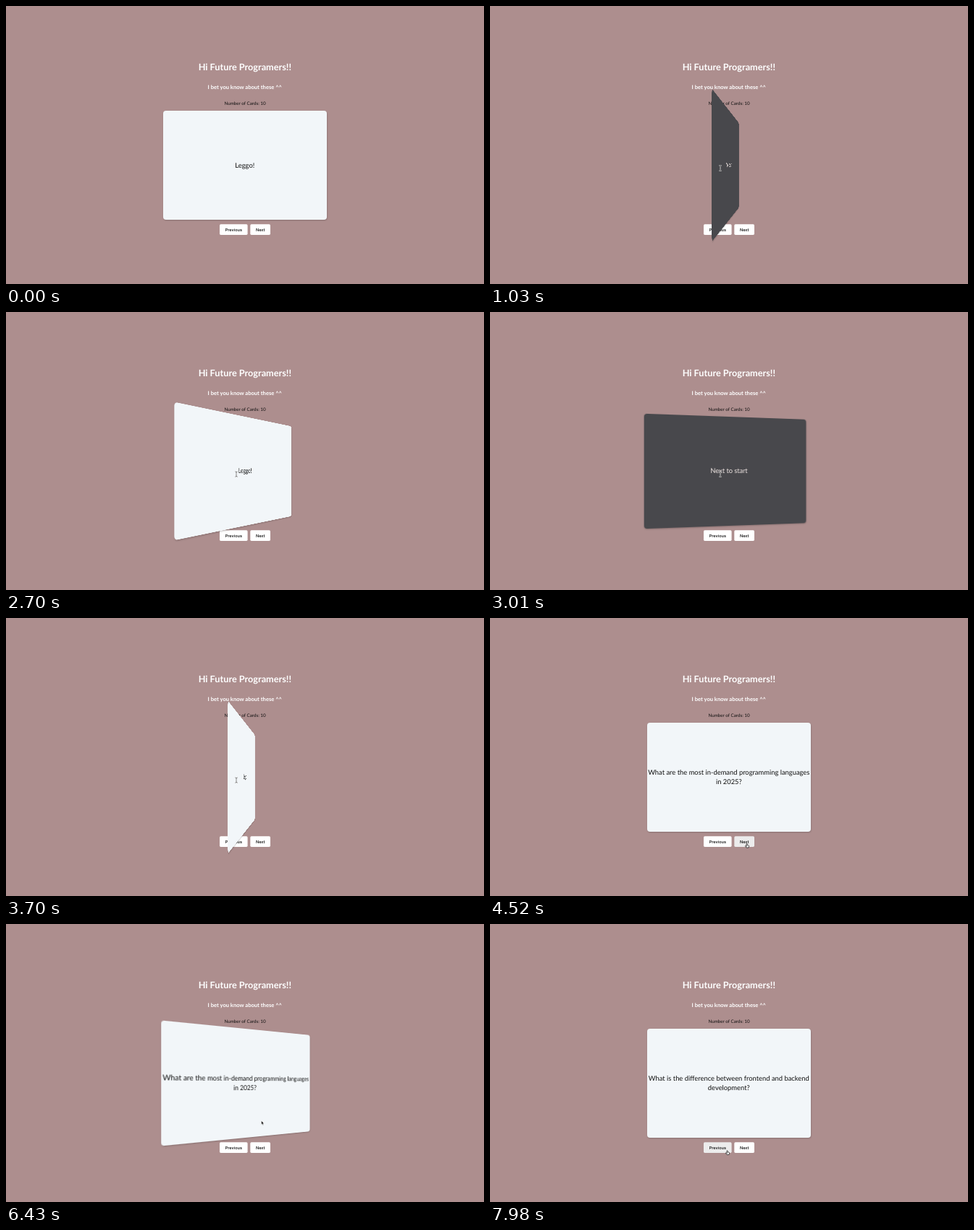
An HTML page for the animation above (8000 ms loop, 660 px wide and 385 px high).

```html
<!DOCTYPE html>
<html lang="en">
<head>
<meta charset="utf-8">
<title>Flashcards</title>
<style>
  html, body { margin: 0; width: 100%; height: 100%; overflow: hidden; background: #ad8e8e; }
  #stage { position: relative; width: 660px; height: 385px; overflow: hidden; }
  svg { position: absolute; left: 0; top: 0; font-family: Lato, sans-serif; text-rendering: geometricPrecision; }
  .btn text { font: 500 5.6px Inter, sans-serif; }
  #scene { position: absolute; left: 216.5px; top: 145.3px; width: 226.6px; height: 151px; perspective: 391px; }
  #card {
    box-sizing: border-box; width: 100%; height: 100%; padding-top: 2px; border-radius: 4px;
    display: flex; align-items: center; justify-content: center;
    font: 9.4px/12.5px Lato, sans-serif; text-align: center; white-space: pre;
    text-rendering: geometricPrecision;
    background: #f2f6f9; color: #111;
    box-shadow: .5px 1px 2px rgba(0, 0, 0, .22);
  }
  #card.back { background: #48484c; color: #f5ebe8; }
</style>
</head>
<body>
<div id="stage">
  <svg width="660" height="385" viewBox="0 0 660 385" text-anchor="middle">
    <g fill="#fff" font-weight="700">
      <text x="329.8" y="88.6" font-size="12.7">Hi Future Programers!!</text>
      <text x="329.8" y="115.2" font-size="7.6">I bet you know about these ^^</text>
    </g>
    <text x="330" y="137" font-size="6.25" fill="#111">Number of Cards: 10</text>
    <g class="btn">
      <rect id="prev" x="295" y="302.3" width="38.6" height="14.6" rx="1.6"/>
      <text x="314.3" y="311.6">Previous</text>
    </g>
    <g class="btn">
      <rect id="next" x="337.3" y="302.3" width="27.7" height="14.6" rx="1.6"/>
      <text x="351.2" y="311.6">Next</text>
    </g>
  </svg>
  <div id="scene"><div id="card"></div></div>
  <svg width="660" height="385" viewBox="0 0 660 385">
    <g id="cursor" stroke-linejoin="round" stroke-linecap="round">
      <g id="beam" fill="none">
        <path d="M-1.3-3.6Q0-3.6 0-2.8V2.8Q0 3.6-1.3 3.6M1.3-3.6Q0-3.6 0-2.8M0 2.8Q0 3.6 1.3 3.6" stroke="#fff" stroke-opacity=".8" stroke-width="1.3"/>
        <path d="M-1.3-3.6Q0-3.6 0-2.8V2.8Q0 3.6-1.3 3.6M1.3-3.6Q0-3.6 0-2.8M0 2.8Q0 3.6 1.3 3.6" stroke="#333" stroke-width=".6"/>
      </g>
      <path id="arrow" d="M0 0V5.2L1.2 4.1L2 6L2.9 5.6L2.1 3.8H3.7Z" fill="#111" stroke="#fff" stroke-width=".5"/>
      <path id="hand" d="M-.5.4Q0-.3.5.4V2.2L2.6 2.7Q3.1 3 3 3.6L2.5 5.8H-.7L-2.2 3.7Q-2.2 2.9-1.4 3.2L-.5 3.9Z" fill="#fff" stroke="#111" stroke-width=".7"/>
    </g>
  </svg>
</div>
<script>
const LOOP = 8000, FLIP = 600;
const $ = id => document.getElementById(id);

const deck = [
  ["Leggo!", "Next to start"],
  ["What are the most in-demand programming languages\nin 2025?",
   "Python, JavaScript, TypeScript, Go, Rust, and Java are\namong the most in-demand languages."],
  ["What is the difference between frontend and backend\ndevelopment?", ""],
  ["What is version control and why is it important in\nsoftware projects?", ""]
];
const flips = [840, 1520, 2590, 3510, 5423, 6100];
const shown = [[0, 0], [4400, 1], [7070, 2], [7240, 3], [7980, 2]];
const path = [ // time, x, y
  [120, 600, 390], [520, 318, 224.6], [3900, 318, 224.6], [4310, 354.6, 312.2],
  [4860, 354.6, 312.2], [5220, 342.6, 257.6], [6200, 342.6, 257.6], [6430, 352.6, 272.6],
  [6530, 352.6, 272.6], [6830, 352.6, 312], [7440, 352.6, 312], [7640, 327.6, 313.6]
];
const buttons = { prev: [295, 333.6], next: [337.3, 365] };

const bez = (s, a, b) => 3 * s * (1 - s) * (1 - s) * a + 3 * s * s * (1 - s) * b + s * s * s;

// CSS "ease": cubic-bezier(.25, .1, .25, 1)
function ease(x) {
  if (x >= 1) return 1;
  let lo = 0, hi = 1;
  for (let i = 0; i < 24; i++) {
    const mid = (lo + hi) / 2;
    if (bez(mid, .25, .25) < x) lo = mid; else hi = mid;
  }
  return bez(lo, .1, 1);
}

function pointer(t) {
  const i = path.findIndex(p => p[0] > t);
  if (i === 0) return null;
  if (i < 0) return path[path.length - 1].slice(1);
  const [t0, x0, y0] = path[i - 1], [t1, x1, y1] = path[i];
  const u = (t - t0) / (t1 - t0), k = u * u * (3 - 2 * u);
  return [x0 + (x1 - x0) * k, y0 + (y1 - y0) * k];
}

function drawCard(t) {
  const past = flips.filter(f => f <= t);
  const p = past.length ? ease((t - past[past.length - 1]) / FLIP) : 1;
  const side = (past.length + (p < .5 ? 1 : 0)) % 2;
  const angle = 180 * Math.min(p, 1 - p);
  const text = deck[shown.filter(s => s[0] <= t).pop()[1]][side];
  const card = $("card");
  if (card.textContent !== text) card.textContent = text;
  card.className = side ? "back" : "";
  card.style.transform = angle ? `rotateY(${angle}deg)` : "none";
}

function drawPointer(t) {
  const at = pointer(t);
  let kind = "arrow";
  for (const id in buttons) {
    const [a, b] = buttons[id];
    const over = at && at[0] > a && at[0] < b && at[1] > 302.3 && at[1] < 317;
    $(id).setAttribute("fill", over ? "#ececec" : "#fff");
    if (over) kind = "hand";
  }
  $("cursor").style.display = at ? "" : "none";
  if (!at) return;
  if (Math.abs(at[1] - 220) < 8 && Math.abs(at[0] - 330) < 110) kind = "beam";
  for (const id of ["beam", "arrow", "hand"]) $(id).style.display = id === kind ? "" : "none";
  $("cursor").setAttribute("transform", `translate(${at})`);
}

function render(t) {
  drawCard(t);
  drawPointer(t);
}

const start = performance.now();
function tick() {
  render((performance.now() - start) % LOOP);
  requestAnimationFrame(tick);
}
tick();
</script>
</body>
</html>
```
